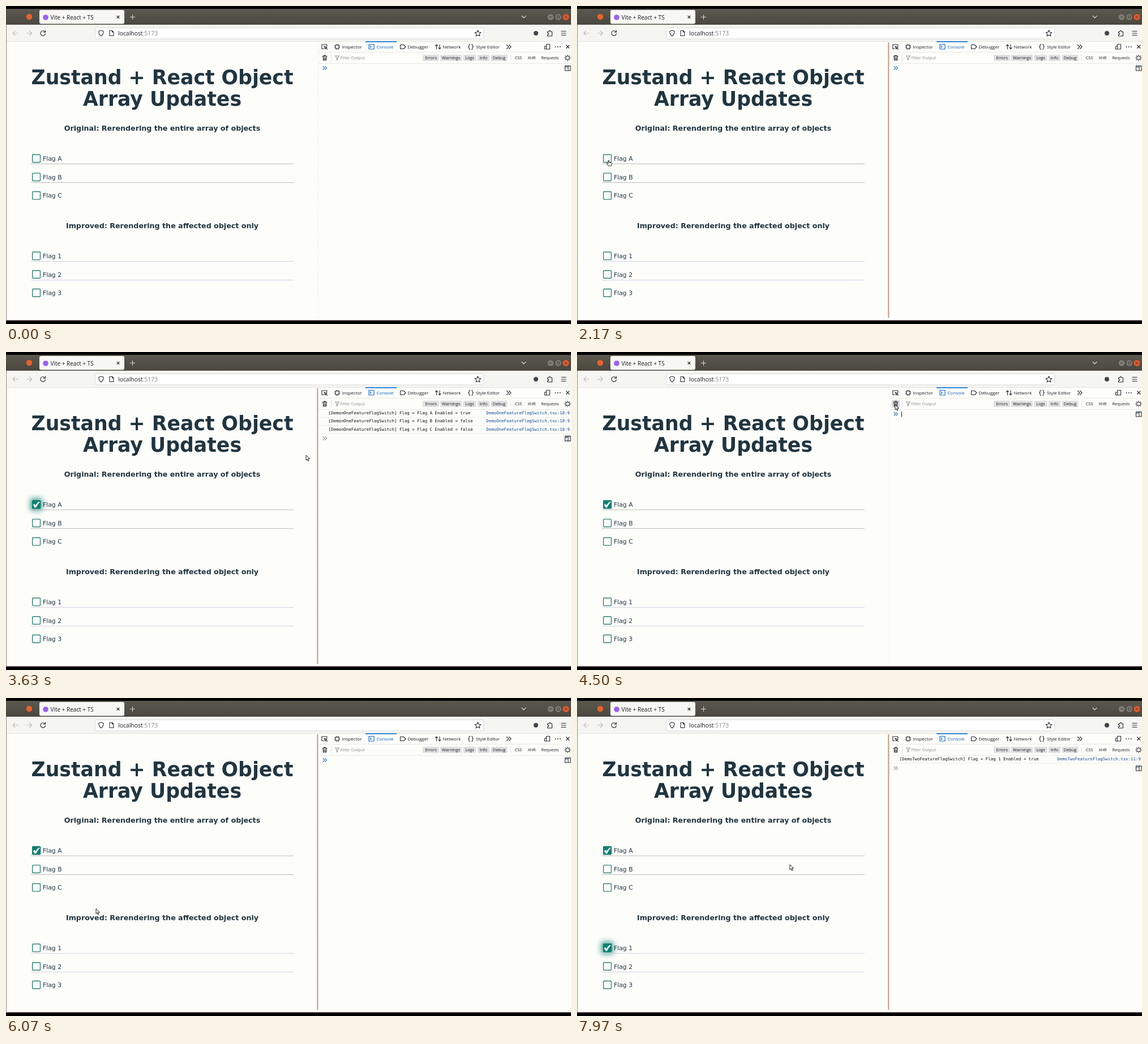
These frames come from a looping animation (998x561 px, 8000 ms). An HTML page:

```html
<!DOCTYPE html>
<html lang="en">
<head>
<meta charset="utf-8">
<title>Array updates demo</title>
<style>
  html, body { margin: 0; width: 100%; height: 100%; overflow: hidden; background: #000; }
  svg { display: block; width: 100%; height: 100%; }
  text { white-space: pre; }
  .ui { font-family: "Open Sans", "Noto Sans", sans-serif; fill: #1c1b22; }
  .tool { font-size: 8px; font-weight: 500; }
  .filter { font-size: 7.3px; }
  .page { font-family: "DejaVu Sans", sans-serif; fill: #203540; }
  .title { font-size: 34.7px; font-weight: bold; text-anchor: middle; }
  .sub { font-size: 12.67px; font-weight: bold; text-anchor: middle; }
  .label { font-size: 10.84px; }
  .log { font: 7.44px "DejaVu Sans Mono", monospace; fill: #101014; }
  .link { fill: #144a94; text-anchor: end; }
  .mid { text-anchor: middle; }
  .icon { fill: none; stroke: #2b2a33; stroke-width: 1.1; stroke-linecap: round; stroke-linejoin: round; }
</style>
</head>
<body>
<svg viewBox="0 0 998 561">
  <defs>
    <linearGradient id="bar" x2="0" y2="1">
      <stop stop-color="#5b594f"/><stop offset="1" stop-color="#49473f"/>
    </linearGradient>
    <filter id="blur" x="-100%" y="-100%" width="300%" height="300%"><feGaussianBlur stdDeviation="4.8"/></filter>
  </defs>
  <rect width="998" height="561"/>
  <rect y="5" width="998" height="28" fill="url(#bar)"/>
  <rect y="33" width="998" height="29" fill="#f5f5f1"/>
  <rect y="62" width="998" height="493" fill="#fdfdfa"/>
  <path d="M0 62.500H998" stroke="#e2e2de"/>
  <path d="M.500 33V554.500H998" fill="none" stroke="#9a7f88"/>

  <!-- tab bar -->
  <circle cx="41" cy="19" r="5.200" fill="#e8622c"/>
  <rect x="59" y="7" width="150" height="24.500" rx="3" fill="#f7f7f3"/>
  <circle cx="70" cy="20" r="4.800" fill="#9a60f2"/>
  <text class="ui" x="78.500" y="23.500" font-size="10">Vite + React + TS</text>
  <path class="icon" d="M196 17.500l4 4m0-4l-4 4"/>
  <g class="icon" style="stroke:#d8d7d0">
    <path d="M219.500 19.500h8m-4-4v8M911 17.500l3.500 3.500 3.500-3.500"/>
  </g>
  <g fill="#7f7d75"><circle cx="962" cy="19.500" r="5.300"/><circle cx="975.500" cy="19.500" r="5.300"/></g>
  <circle cx="989" cy="19.500" r="5.500" fill="#e5582b"/>
  <path d="M959.500 19.500h5M973.500 17.500h4v4h-4zM987 17.500l4 4m0-4l-4 4" fill="none" stroke="#3d3b35"/>

  <!-- address bar -->
  <rect x="157.500" y="38.500" width="686" height="19.500" rx="2.500" fill="#fff" stroke="#d9d9d6"/>
  <g class="icon" style="stroke:#bdbdbb"><path d="M21 48h-9m4-4l-4 4 4 4M36.500 48h9m-4-4l4 4-4 4"/></g>
  <g class="icon">
    <path d="M68.800 45.500a4.300 4.300 0 1 0 .7 3.500M69.500 43v3.200h-3.200"/>
    <path d="M168 43l4.200 1.500c0 4-1 6.500-4.200 8.500-3.200-2-4.200-4.500-4.200-8.500z"/>
    <path d="M183 43.500h4.500l2.500 2.500v6.500h-7zM187.500 43.500v2.500h2.500"/>
    <path d="M833.500 42.800l1.600 3.500 3.800.4-2.800 2.600.8 3.800-3.400-1.900-3.400 1.900.8-3.800-2.800-2.600 3.800-.4z"/>
    <path d="M956.500 45.500h2.500c-.5-3 3.500-3 3 0h2.500v7.500h-8v-2.500c3 .5 3-3 0-2.500z"/>
    <path d="M981 44.500h8M981 48h8M981 51.500h8"/>
  </g>
  <circle cx="936" cy="48" r="4" fill="#45444c"/>
  <text class="ui" x="198" y="51.500" font-size="10.400">localhost<tspan fill="#85858a">:5173</tspan></text>

  <!-- page -->
  <g class="page">
    <text class="title" x="276" y="138.300">Zustand + React Object</text>
    <text class="title" x="276" y="176.300">Array Updates</text>
    <text class="sub" x="276" y="220.300">Original: Rerendering the entire array of objects</text>
    <text class="sub" x="276" y="391.500">Improved: Rerendering the affected object only</text>
    <g id="flags"></g>
  </g>

  <!-- developer tools -->
  <path d="M551.500 63V550" stroke="#e3e3dc" stroke-dasharray="1 2"/>
  <path id="splitter" d="M550.300 64V550" stroke="#c99a82" stroke-width="2"/>
  <path d="M552 81.500H998M552 101.500H998" stroke="#e8e8e6"/>
  <rect x="635" y="62" width="55" height="2" fill="#2f86dc"/>
  <path d="M574.500 85v13M891.500 86v11" stroke="#dededd"/>
  <g class="icon">
    <path d="M561 75.500h-3.200v-7.500h9v3M562 71l5 1.800-2.200.9-.9 2.300zM565 74l2.500 2.500"/>
    <path d="M582 69h6v6h-6zM583.500 69v-1.500m3 1.500v-1.500m-3 9V75m3 1.500V75M580.500 70.500h1.500m-1.500 3h1.500m6-3h1.500m-1.500 3h1.500"/>
    <path d="M696.500 68.500h6l3.500 3.500-3.500 3.500h-6zM760.500 76v-8m-2 2.300l2-2.300 2 2.300M766 68v8m-2-2.300l2 2.300 2-2.300"/>
    <path d="M819.500 67.500c-2 0-1.500 1.500-1.500 2.800s-1 1.700-1.500 1.700c.5 0 1.500.4 1.500 1.700s-.5 2.800 1.500 2.800M822.500 67.500c2 0 1.500 1.500 1.500 2.800s1 1.700 1.500 1.700c-.5 0-1.500.4-1.500 1.700s.5 2.800-1.500 2.800"/>
    <path d="M884.500 68.500l3.500 3.500-3.500 3.500m4-7l3.500 3.500-3.500 3.500"/>
    <path d="M954.500 67.500h6v8.500h-6zM951.500 71h3v5h-3zM989.500 69l5.500 5.500m0-5.500l-5.500 5.500"/>
    <path d="M970.500 72h.1m4 0h.1m4 0h.1" stroke-width="1.800"/>
    <circle cx="992" cy="91.500" r="3.200"/>
    <path d="M992 87v-.8m0 10.600V96M987.500 91.500h-.8m10.600 0h-.8M988.800 88.300l-.5-.5m7.400 7.400l-.5-.5m-6.400 0l-.5.500m7.400-7.400l-.5.500"/>
    <path d="M581.500 88h7l-2.600 3.200v3l-1.800 1v-4z" style="stroke:#9b9ba0"/>
    <path d="M641 67.500h9v8.500h-9zM643 70l2 1.800-2 1.800" style="stroke:#0d67c8"/>
  </g>
  <rect id="trashHover" x="556" y="84.500" width="14" height="14" rx="2" fill="#d8d8d8"/>
  <path class="icon" d="M559 88.500h8M561.500 88.500v-1.500h3v1.500M560 89l.5 6.800h5l.5-6.800M562 90.500v4m2-4v4"/>
  <g class="ui tool">
    <text x="593.500" y="74.700">Inspector</text>
    <text x="654.500" y="74.700" fill="#0d5fbd">Console</text>
    <text x="709.500" y="74.700">Debugger</text>
    <text x="771.500" y="74.700">Network</text>
    <text x="830" y="74.700">Style Editor</text>
  </g>
  <g class="ui filter">
    <text x="590.500" y="94.200" fill="#88888d">Filter Output</text>
    <g id="pills" class="mid"></g>
  </g>
  <g id="logs"></g>
  <g id="prompt">
    <path id="chevrons" class="icon" d="M560 106.700l2.800 2.800-2.800 2.800m3.600-5.600l2.800 2.800-2.800 2.800"/>
    <path class="icon" d="M987.500 105.500h9.500v8.500h-9.500zM993 105.500v8.500M987.500 107.500h5.500"/>
    <path d="M995 104.500v3" stroke="#3186d8"/>
  </g>
  <path id="caret" d="M573.500 105v9.500" stroke="#1c1b22"/>

  <g id="cursor" stroke="#222" stroke-linejoin="round">
    <path id="arrow" d="M0 0V9l2.100-1.900 1.500 3.300 1.500-.7-1.500-3.200 2.900-.2z" fill="#fff"/>
    <path id="hand" d="M-1 1c0-1.300 1.700-1.300 1.700 0v2.700l3.800.8c.9.300 1 .9.800 1.800l-.8 3.700h-5l-3-3.500c-.7-1 .5-1.700 1.300-1l1.200 1z" fill="#fff"/>
    <path id="resize" d="M-5 0h3m-1.500-2l2 2-2 2M.300-4v8M2.500-4v8M4.500-4v8M2.500 0h2" fill="none"/>
  </g>
</svg>
<script>
const LOOP = 8000;
const CLICK_A = 2500, CLEAR = 4200, CLICK_1 = 6500;
const LOG_STEP = 14.3;
const $ = id => document.getElementById(id);
const show = (id, on) => $(id).setAttribute("visibility", on ? "visible" : "hidden");

const flags = [["A", 269], ["B", 301.7], ["C", 334.3], ["1", 440.8], ["2", 473.5], ["3", 506]];
$("flags").innerHTML = flags.map(([name, y], i) => `
  <rect id="glow${name}" x="42.500" y="${y - 11}" width="22" height="22" rx="4" fill="#128674" opacity=".75" filter="url(#blur)"/>
  <rect x="46.700" y="${y - 6.800}" width="13.800" height="13.600" rx="1" fill="#fdfdfa" stroke="#2c8579" stroke-width="1.400"/>
  <g id="tick${name}">
    <rect x="46" y="${y - 7.500}" width="15.200" height="15" rx="1.500" fill="#128074"/>
    <path d="M47.800 ${y + .8}l2.500-1.800 1.800 2.500q2.800-4.700 6-6.700l1.500 1q-4 4-6.600 9.700h-2.200z" fill="#fff"/>
  </g>
  <text class="label" x="65" y="${y + 4}">Flag ${name}</text>
  ${i % 3 < 2 ? `<path d="M44 ${Math.round(y + 9) + .5}H508" stroke="${i < 3 ? "#bdbdbb" : "#d3d3e6"}"/>` : ""}`).join("");

const pills = [["Errors", 750.5, 29], ["Warnings", 786, 38], ["Logs", 819, 23], ["Info", 843.5, 21],
  ["Debug", 871, 29], ["CSS", 905], ["XHR", 928.5], ["Requests", 961]];
$("pills").innerHTML = pills.map(([name, x, w]) =>
  (w ? `<rect x="${x - w / 2}" y="86" width="${w}" height="11" rx="1.500" fill="#e0e0e1"/>` : "") +
  `<text x="${x}" y="94.200">${name}</text>`).join("");

const logLine = (text, link, i) => `
  <text class="log" x="569.500" y="${110 + i * LOG_STEP}">${text}</text>
  <text class="log link" x="996" y="${110 + i * LOG_STEP}">${link}</text>
  <path d="M552 ${115.200 + i * LOG_STEP}H998" stroke="#ededeb"/>`;
const firstLogs = ["A", "B", "C"].map((name, i) => logLine(
  `[DemonOneFeatureFlagSwitch] Flag = Flag ${name} Enabled = ${name === "A"}`,
  "DemoOneFeatureFlagSwitch.tsx:10:9", i)).join("");
const secondLogs = logLine("[DemoTwoFeatureFlagSwitch] Flag = Flag 1 Enabled = true",
  "DemoTwoFeatureFlagSwitch.tsx:11:9", 0);

// Pointer path: time, x, y
const path = [[820, 996, 362], [970, 881, 354], [1850, 56, 272], [2900, 56, 272], [3630, 530, 182],
  [4080, 562, 93], [5500, 562, 93], [6300, 59, 441], [7150, 59, 441], [7970, 376, 294], [LOOP, 376, 294]];

function pointerAt(t) {
  const i = Math.max(1, path.findIndex(p => p[0] > t));
  const [t0, x0, y0] = path[i - 1], [t1, x1, y1] = path[i];
  const u = Math.min(1, Math.max(0, (t - t0) / (t1 - t0)));
  const k = u * u * (3 - 2 * u);
  return [x0 + (x1 - x0) * k, y0 + (y1 - y0) * k];
}

let shownLogs = "";
function setLogs(markup) {
  if (markup !== shownLogs) $("logs").innerHTML = shownLogs = markup;
}

function draw(t) {
  const afterA = t >= CLICK_A && t < CLEAR, after1 = t >= CLICK_1;
  for (const [name] of flags) {
    show("tick" + name, name === "A" ? t >= CLICK_A : name === "1" && after1);
    show("glow" + name, name === "A" ? afterA : name === "1" && after1);
  }
  setLogs(afterA ? firstLogs : after1 ? secondLogs : "");
  const rows = afterA ? 3 : after1 ? 1 : 0;
  $("prompt").setAttribute("transform", `translate(0 ${rows * LOG_STEP})`);
  $("chevrons").style.stroke = rows ? "#8c8c91" : "#1c6fd0";
  show("caret", t >= CLEAR && !after1 && (t - CLEAR) % 1000 < 500);

  const [x, y] = pointerAt(t);
  const visible = t >= path[0][0];
  const overBox = x < 65 && flags.some(f => Math.abs(f[1] - y) < 9);
  const resizing = t < 1050;
  $("cursor").setAttribute("transform", `translate(${x} ${y})`);
  show("arrow", visible && !overBox && !resizing);
  show("hand", visible && overBox);
  show("resize", visible && resizing);
  show("splitter", visible && x < 550);
  show("trashHover", Math.abs(x - 563) < 7 && Math.abs(y - 91.5) < 7);
}

const start = performance.now();
function frame() {
  draw((performance.now() - start) % LOOP);
  requestAnimationFrame(frame);
}
frame();
</script>
</body>
</html>
```
